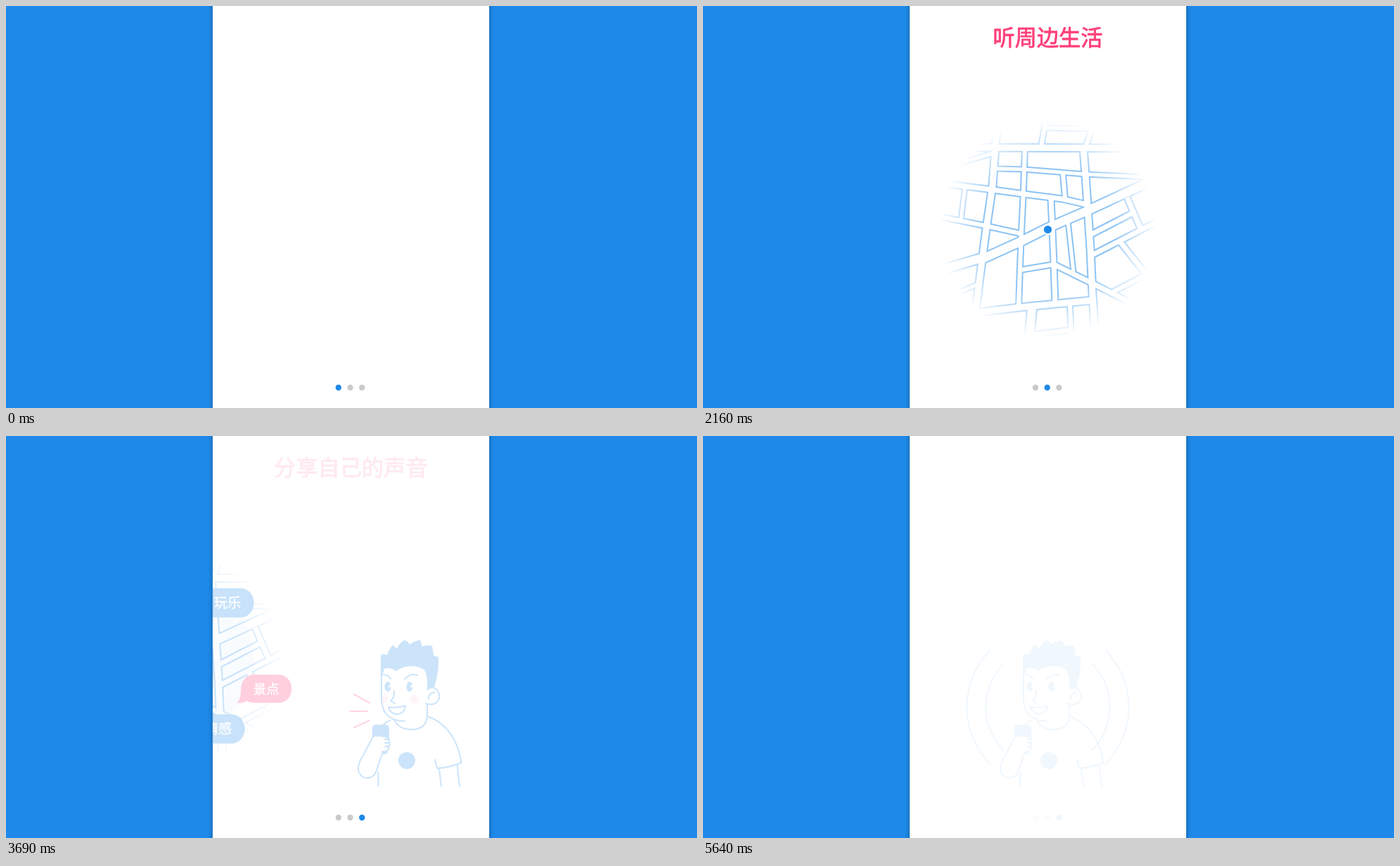
An HTML page that plays this animation: 981 px wide and 571 px high, repeating every 6600 ms.

```html
<!DOCTYPE html>
<html lang="zh-CN">
<head>
<meta charset="utf-8">
<style>
  html, body { margin: 0; height: 100%; overflow: hidden; background: #1e89e9; }
  svg { display: block; width: 100vw; height: 100vh; --blue: #1e89e9; --pink: #ff3f78; }
  text { font-family: "Noto Sans CJK SC", "Noto Sans CJK", "Noto Sans", sans-serif; text-anchor: middle; }
  .title { font-size: 31.2px; fill: var(--pink); stroke: var(--pink); stroke-width: .8; }
  .label { font-size: 18.5px; fill: #fff; stroke: #fff; stroke-width: .25; }
  .line { fill: none; stroke: var(--blue); stroke-width: 2; stroke-linecap: round; stroke-linejoin: round; }
  .solid { fill: var(--blue); }
  .paper { fill: #fff; }
  .pale { fill: #d3e6fa; }
  .pink { fill: var(--pink); }
  .pinkline { fill: none; stroke: var(--pink); stroke-width: 2; }
  .panel { fill: #fff; filter: drop-shadow(0 0 3px rgba(0,0,0,.4)); }
  #clouds path { vector-effect: non-scaling-stroke; }
</style>
</head>
<body>
<svg viewBox="0 0 981 571" preserveAspectRatio="none">
  <defs>
    <clipPath id="page"><rect x="293.5" width="392.5" height="571"/></clipPath>
    <radialGradient id="fade" gradientUnits="userSpaceOnUse" cx="489" cy="317" r="156">
      <stop offset=".6" stop-color="#fff"/><stop offset="1" stop-color="#000"/>
    </radialGradient>
    <mask id="disc"><circle cx="489" cy="317" r="156" fill="url(#fade)"/></mask>
  </defs>
  <rect class="panel" x="293.5" y="-20" width="392.5" height="611"/>

  <g clip-path="url(#page)">
    <text class="title" id="title0" x="489.5" y="56">听景点讲解</text>
    <text class="title" id="title1" x="489.5" y="56">听周边生活</text>
    <text class="title" id="title2" x="489.5" y="56">分享自己的声音</text>

    <g id="page0">
      <g id="city" class="line">
        <!-- skyscraper -->
        <path d="M343 320V344M354 320V344M335 494V360L343 349H355L364 360V440L368 445V491"/>
        <path d="M349 346L335 360L364 388L335 415M349 346L364 360L335 388L364 415M335 415L368 445L335 478L349 492M364 415L335 440L366 470L346 493"/>
        <path class="solid" stroke="none" d="M342 342H355V349H342z"/>
        <path class="pinkline" d="M349 348V425"/>
        <!-- pagoda -->
        <path d="M415.5 338V370"/>
        <circle class="solid" cx="415.5" cy="346.500" r="2.500"/>
        <ellipse class="solid" cx="415.500" cy="370" rx="5.500" ry="3.500"/>
        <path class="solid" stroke-width="1" d="M383 390Q404 384 411 367H420Q427 384 448 390Q446 393 441 394H390Q385 393 383 390z"/>
        <g id="floors"></g>
        <path class="pale" d="M346 494Q372 453 415 453Q440 453 461 466V486Q400 488 346 494z"/>
        <!-- gate -->
        <path class="paper" d="M461 457H644.500V495Q560 486 461 487z"/>
        <path stroke-width="4.500" stroke-linecap="butt" d="M460 457H645.500"/>
        <path class="pale" d="M508 486V477H528V487M542 487V474H561V488M575 489V477H594V490"/>
        <path d="M502 400Q502 406 499 411V419H619Q607 413 602 400L604 408H503M500 428H622M500 439H630Q623 437 618 428"/>
        <path stroke-width="10" stroke-linecap="butt" stroke-dasharray="2 5" d="M504 413.500H612M504 433.500H622"/>
        <path stroke-width="3" d="M500 422H606M502 440H625"/>
        <path class="solid" stroke="none" d="M548 421H556V429H548z"/>
        <path class="pinkline" d="M514 442V454M532 442V454M567 442V454M590 442V454M608 442V454M619 442V454"/>
        <rect class="pink" stroke="none" x="535" y="463" width="33" height="7" rx="2"/>
        <!-- broadcast tower -->
        <path class="paper" d="M490 238V257L487 290H493L490 257M487 302L485.500 322H495L493 302M482 345H498V424H482z"/>
        <path stroke-width="4.500" stroke-linecap="butt" d="M483.300 344V424M497 344V424M477 456L465 486M503 456L515 486"/>
        <path d="M484 358H497M484 370.500H497M484 383H497M484 396H497M484 409H497M490 458V485M473 468L490 482L507 468M470 484L490 470L510 484"/>
        <circle class="paper" cx="490" cy="295.500" r="6.500"/>
        <circle class="paper" cx="490" cy="334" r="12.500"/>
        <circle class="paper" cx="490" cy="440" r="18"/>
        <path class="pink" stroke="none" d="M485 293.500H495V297.500H485zM479 330H501V338H479zM474 434H506V446H474z"/>
        <path d="M328 497Q490 475 653 497"/>
      </g>
      <g id="clouds"></g>
      <g id="sparks" class="line"></g>
      <g id="sun">
        <circle class="pink" cx="603" cy="179.500" r="18.500"/>
        <circle class="pinkline" cx="603" cy="179.500" r="25"/>
        <circle class="pinkline" id="rays" cx="603" cy="179.500" r="33" pathLength="8" stroke-dasharray="1 1"/>
      </g>
    </g>

    <g id="page1">
      <g id="map" mask="url(#disc)"></g>
      <circle id="range" class="solid" cx="489.500" cy="317.500" opacity=".1"/>
      <g id="pin"><circle class="paper" r="9.500"/><circle class="solid" r="7"/></g>
      <g id="bubbles"></g>
    </g>

    <g id="page2">
      <path id="wave" class="pinkline" stroke-linecap="round"/>
      <g id="arcs" class="line">
        <circle cx="489.500" cy="385" r="88" pathLength="4" stroke-dasharray="1 1" stroke-linecap="butt"/>
        <circle cx="489.500" cy="385" r="115" pathLength="4" stroke-dasharray="1 1" stroke-linecap="butt"/>
      </g>
      <g id="man" class="line">
        <path class="paper" stroke="none" d="M474 402L520 398Q560 412 569 464L534 472V498H450V420z"/>
        <path d="M520 398Q560 412 568.500 464Q552 471 534 472L531 460M537 473L540 498M562.500 467L566 498M450.500 478V497M456 412Q463 404 474 402"/>
        <path class="paper" stroke="none" d="M455 335V375Q457 405 474 405Q482 417 496 417Q520 417 520 396V335z"/>
        <g id="blush" stroke="none" fill="#ffd0de">
          <path d="M456 367.500A6 6 0 1 1 456 378.500z"/><circle cx="501.500" cy="374" r="6.500"/>
        </g>
        <path d="M455 338V375Q457 405 488 405M474 405Q482 417 496 417Q520 417 520 396V381"/>
        <path class="paper" d="M520 360Q528 354 534 361Q539 368 536 375Q531 384 518 380"/>
        <path d="M522 374Q521 366 530 364M458 339Q464 339 468 345M488 345Q497 336 506 340M473 362Q474 372 468 376L474 380"/>
        <path class="paper" d="M465 385Q478 387 489 383Q488 395 476 395Q467 394 465 385z"/>
        <g stroke="none">
          <path class="solid" d="M454 348V313Q454 308 463 311Q466 302 471 297L477 302Q482 292 488 290Q493 292 495 296Q502 291 510 290L513 299Q520 296 527 298L529 312L536 314Q537 335 530 357L520 360Q521 340 516 332Q506 326 492 327Q481 330 475 334Q470 329 460 330Q456 336 456 346z"/>
          <ellipse class="solid" cx="464" cy="356" rx="4.500" ry="7"/><ellipse class="solid" cx="495" cy="356" rx="4.500" ry="7"/>
          <path class="paper" d="M464 356L470 351V358zM495 356L501 351V358z"/>
          <circle class="solid" cx="491" cy="461" r="12"/>
          <rect class="solid" x="442" y="410" width="24" height="24" rx="5"/>
          <rect class="solid" x="455" y="428" width="9" height="24" rx="4"/>
        </g>
        <path class="paper" d="M443 427Q452 424 462 428Q468 430 466 435Q468 438 465 440Q467 443 464 445Q464 449 457 448L447 478Q441 488 430 485Q418 478 424 463z"/>
        <path d="M460 431H465M460 436H466M460 441H465"/>
        <path id="shout" class="pinkline" d="M416 367L438 379M411 391H435M416 414L438 404"/>
      </g>
    </g>
  </g>
  <g id="dots"></g>
</svg>
<script>
const $ = id => document.getElementById(id);
const LOOP = 6600, HOLD = 5640;

// Static parts built from short rules
$('floors').innerHTML = [0, 1, 2].map(i => {
  const y = 396 + 20 * i, w = 33.5 + 2 * i;
  return `<path stroke-width="11" stroke-linecap="butt" stroke-dasharray="2 5" d="M${391 - i} ${y}H${443 + i}"/>
    <path d="M${387 - i} ${y + 5}H${445 + i}"/>
    <path class="solid" stroke-width="1" d="M${416 - w} ${y + 11}Q${420 - w} ${y + 13} 392 ${y + 7}H440Q${412 + w} ${y + 13} ${416 + w} ${y + 11}L${408 + w} ${y + 16}H${424 - w}z"/>`;
}).join('') + '<path stroke-width="8" stroke-linecap="butt" stroke-dasharray="2 5" d="M388 456H446"/>';

const cloud = 'M53 0H7.500A7.500 7.500 0 0 1 6 -14.500A9.700 9.700 0 0 1 25 -14.500A6.500 6.500 0 0 1 31 -8';
const clouds = [[331, 192, 1, 1, 520], [354.5, 262, 1.48, 1.48, 420], [570, 241.5, -1, 1, 520], [649.5, 286, -1.48, 1.48, 420]];
$('clouds').innerHTML = clouds.map(([x, y, sx, sy]) =>
  `<path class="line" d="${cloud}" transform="translate(${x} ${y}) scale(${sx} ${sy})"/>`).join('');

// x, y, start time, ring or plus
const sparks = [[446.5, 198, 400, 1], [525, 271, 430, 1], [608, 239, 610, 1], [363.5, 274, 780, 1],
  [450.5, 290, 400], [595.5, 314.5, 430], [539.5, 179.5, 510], [334.5, 224.5, 575],
  [423, 172, 660], [513, 213, 720], [629.5, 230, 840]];
$('sparks').innerHTML = sparks.map(([x, y, , ring]) => ring
  ? `<circle cx="${x}" cy="${y}" r="3"/>`
  : `<path stroke-linecap="butt" d="M${x - 3.5} ${y}h7M${x} ${y - 3.5}v7"/>`).join('');

// Roads by width; a wide blue pass under a white one leaves the kerbs
const roads = [
  [5, 'M415 231L455 232L543 239L630 243M487 173L560 175M350 228L412 209M372 257L366 305M345 415L388 396M518 305L526 378'],
  [6, 'M457 202L455 262L452 322L450 372L448 430M511 238L514 274M340 300L400 312L450 323M450 375L498 367M465 467L522 460M582 406L632 380M487 160L480 200M543 200L554 170M521 425L523 475'],
  [7, 'M340 252L411 261L455 267L510 274L545 282M494 273L496 318L498 365L500 424M498 367L553 394L612 424M548 326L610 294M550 355L622 318L645 306M602 272L622 318M593 336L632 385'],
  [9, 'M360 201L620 202M418 165L415 202L411 256L403 310L397 355L388 425L383 455M540 202L543 240L546 285L550 345L553 410L557 470M375 437L450 428L553 418'],
  [12, 'M640 247L545 291L490 315L452 334L397 359M467 430L463 475M335 376L395 358']];
$('map').innerHTML = [[4, 'var(--blue)'], [0, '#fff']].map(([extra, color]) => roads.map(([w, d]) =>
  `<path fill="none" stroke="${color}" stroke-width="${w + extra}" d="${d}"/>`).join('')).join('');

const bubbles = [[428, 220, '美食'], [563, 237, '玩乐'], [390, 307.5, '购物'],
  [618, 359, '景点'], [407, 423, '住宿'], [550, 416, '情感']];
const blueBubble = i => [1, 2, 5].includes(i);
$('bubbles').innerHTML = bubbles.map(([, , label], i) =>
  `<g><path class="${blueBubble(i) ? 'solid' : 'pink'}" d="M-36 0A18 20 0 0 1 -18 -20H18A18 20 0 0 1 18 20H-18Q-24 20 -28 17Q-33 21 -42 20Q-36 16 -36 0z"/>
   <text class="label" y="6.500">${label}</text></g>`).join('');

$('dots').innerHTML = [472, 488.7, 505.4].map(x => `<circle cx="${x}" cy="542" r="4.200"/>`).join('');

const bars = [10, 7, 13, 20, 10, 14, 42, 29, 21, 14, 35, 10, 5, 27, 49, 10, 29, 17, 22, 13, 33, 9,
  5, 21, 20, 47, 17, 5, 14, 22, 16, 42, 9, 5, 14, 27, 33, 14, 19, 27, 20, 13, 7, 6];

// Timing helpers
const ramp = (t, from, to) => Math.min(1, Math.max(0, (t - from) / (to - from)));
const easeOut = p => 1 - (1 - p) ** 3;
const smooth = p => p * p * (3 - 2 * p);
const back = p => 1 + 3 * (p - 1) ** 3 + 2 * (p - 1) ** 2;
const set = (el, opacity, transform = '') => {
  el.setAttribute('opacity', opacity);
  el.setAttribute('transform', transform);
};

function leave(page, t, start) {
  const p = ramp(t, start, start + 420);
  set(page, 1 - p ** 1.2, `translate(${-400 * p * p} 0)`);
}

function draw(t) {
  const out = 1 - ramp(t, 5250, 5665);
  const pinkOut = Math.max(0, (out - .1) / .9);

  set($('title0'), smooth(ramp(t, 30, 360)) * (1 - smooth(ramp(t, 1560, 1890))));
  set($('title1'), smooth(ramp(t, 1830, 2130)) * (1 - smooth(ramp(t, 3360, 3690))));
  set($('title2'), smooth(ramp(t, 3630, 3930)) * pinkOut);

  leave($('page0'), t, 1560);
  set($('city'), smooth(ramp(t, 60, 450)));
  clouds.forEach(([, , , , start], i) => $('clouds').children[i].setAttribute('opacity', ramp(t, start, start + 150)));
  sparks.forEach(([, , start], i) => set($('sparks').children[i], ramp(t, start, start + 150)));
  const shine = easeOut(ramp(t, 540, 1140));
  set($('sun'), shine);
  set($('rays'), 1, `rotate(${-45 - 25 * (1 - shine)} 603 179.5)`);

  leave($('page1'), t, 3360);
  set($('map'), ramp(t, 2070, 2250));
  const drop = easeOut(ramp(t, 1920, 2130));
  set($('pin'), drop, `translate(489.5 317.5) scale(${.8 * drop + .2 * ramp(t, 2160, 2340)})`);
  $('range').setAttribute('r', 111 * easeOut(ramp(t, 2250, 2580)));
  bubbles.forEach(([x, y], i) => {
    const start = 2250 + 36 * i, size = back(ramp(t, start, start + 270)) * (blueBubble(i) ? 1.04 : 1);
    set($('bubbles').children[i], 1, `translate(${x} ${y}) scale(${size})`);
  });

  const enter = easeOut(ramp(t, 3660, 4050));
  set($('page2'), 1);
  set($('man'), enter * out, `translate(${100 * (1 - enter)} 0)`);
  for (const id of ['shout', 'blush']) set($(id), pinkOut);
  const sound = ramp(t, 4050, 4500), grow = .9 + .18 * smooth(sound);
  set($('wave'), Math.min(1, 2.5 * sound * sound) * pinkOut);
  $('wave').setAttribute('d', bars.map((h, i) =>
    `M${341 + i * 6.93} ${201 - h * grow}v${2 * h * grow}`).join(''));
  set($('arcs'), sound * sound * out, `rotate(${-45 - 90 * (1 - easeOut(sound))} 489.5 385)`);

  const active = t < 1890 ? 0 : t < 3690 ? 1 : 2;
  set($('dots'), out);
  [...$('dots').children].forEach((dot, i) => dot.setAttribute('fill', i === active ? '#1e89e9' : '#cacaca'));
}

function tick() {
  draw(Math.min(performance.now() % LOOP, HOLD));
  requestAnimationFrame(tick);
}
tick();
</script>
</body>
</html>
```
